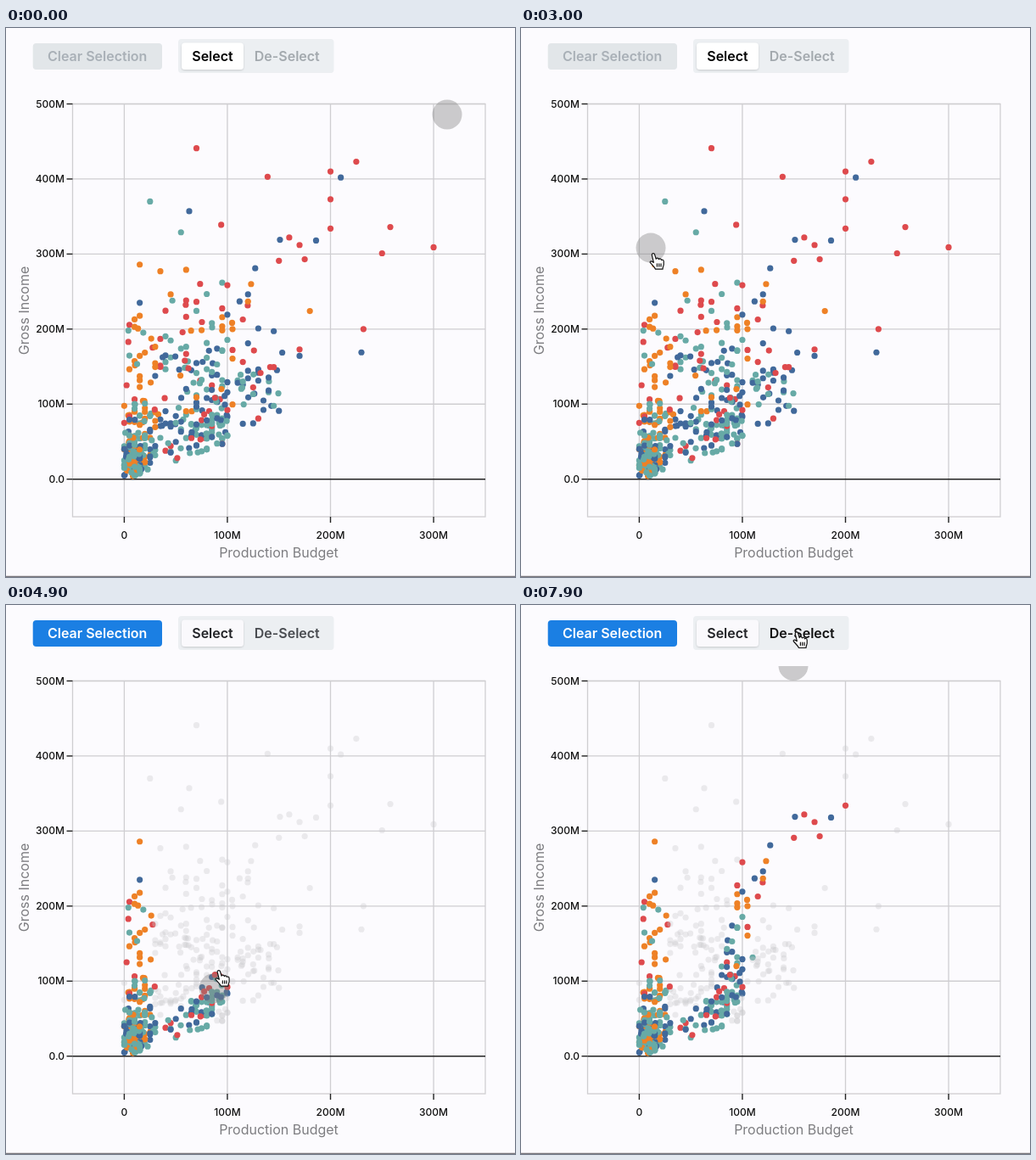
Animation, 600 px wide and 647 px high, one loop 8 s. Source, as an HTML page:

```html
<!DOCTYPE html>
<html lang="en">
<head>
<meta charset="utf-8">
<title>Brush selection on a scatter plot</title>
<style>
html, body { margin: 0; width: 100%; height: 100%; overflow: hidden; background: #fcfbfe; }
svg { display: block; font-family: Inter, Roboto, "Liberation Sans", sans-serif; }
.btn { font-size: 16px; font-weight: 600; text-anchor: middle; }
.tick { font-size: 12px; font-weight: 500; fill: #111; }
.label { font-size: 16px; fill: #7d7d80; text-anchor: middle; }
.grid { stroke: #cfced1; stroke-width: 1.3; fill: none; }
.axis { stroke: #222; stroke-width: 1.4; }
</style>
</head>
<body>
<svg width="600" height="647" viewBox="0 0 600 647">
  <defs>
    <clipPath id="chart"><rect y="72" width="600" height="575"/></clipPath>
    <filter id="soft" x="-20%" y="-20%" width="140%" height="150%">
      <feDropShadow dx="0" dy="1" stdDeviation="1.2" flood-opacity=".16"/>
    </filter>
  </defs>
  <rect id="clearBox" x="31.7" y="18" width="152.3" height="31" rx="4"/>
  <text id="clearText" class="btn" x="107.7" y="39">Clear Selection</text>
  <rect x="203" y="13" width="183.5" height="40" rx="4" fill="#eceff2"/>
  <rect id="tab" x="207" y="17.5" width="73" height="31.5" rx="4" filter="url(#soft)"/>
  <text id="selectText" class="btn" x="243.5" y="39">Select</text>
  <text id="deselectText" class="btn" x="331.3" y="39">De-Select</text>
  <g id="axes"></g>
  <text class="label" x="321.5" y="624">Production Budget</text>
  <text class="label" transform="translate(27 333) rotate(-90)">Gross Income</text>
  <g id="dots"></g>
  <g clip-path="url(#chart)"><circle id="brush" r="17.5" fill="#808080" fill-opacity=".4"/></g>
  <path d="M0 646.3H600" stroke="#77767a" stroke-width="1.3"/>
  <g id="arrow" stroke="#fff" stroke-width="1.2" stroke-linejoin="round">
    <path d="M0 0V17.2L4 13.6 6.6 19.6 9.6 18.3 7 12.4H12.4Z" fill="#000"/>
  </g>
  <g id="hand" stroke="#111" stroke-width="1.2" stroke-linejoin="round" stroke-linecap="round">
    <path fill="#fff" d="M-1.8 1.8C-1.8-.6 1.2-.6 1.6 1.4L3.2 6.6C3.4 5 6 5 6.4 7 7 5.8 9.2 6 9.4 7.8 10.2 7 12.2 7.4 12.2 9.4V13C12 15 11 16 11 18.5H2.5C1.5 16-1 14-3.6 11-4.6 9.4-2.6 8.4-.6 10.2L.4 10.6Z"/>
    <path fill="none" d="M4.4 12.2V15.4M6.7 12.2V15.4M9 12.2V15.4"/>
  </g>
</svg>
<script>
const LOOP = 8000, LAG = 90, RADIUS = 17.5, TOP = 71.5;
const PRESS = 2950, RELEASE = 6020, EXIT = 7400;
const RED = "#de4a4d", BLUE = "#41699b", ORANGE = "#ee8126", TEAL = "#67aaa6";

const $ = id => document.getElementById(id);
const xAt = budget => 139.4 + budget * 1.2155;
const yAt = gross => 531.7 - gross * 0.8844;

function add(parent, tag, attrs, text) {
  const el = document.createElementNS("http://www.w3.org/2000/svg", tag);
  for (const k in attrs) el.setAttribute(k, attrs[k]);
  if (text) el.textContent = text;
  parent.appendChild(el);
  return el;
}

// Axes and grid
const axes = $("axes");
add(axes, "rect", { class: "grid", x: 78.5, y: 89.5, width: 486.5, height: 486.5 });
for (let i = 0; i < 4; i++) {
  const x = xAt(i * 100);
  add(axes, "path", { class: "grid", d: `M${x} 89.5V576` });
  add(axes, "path", { class: "axis", d: `M${x} 576v7` });
  add(axes, "text", { class: "tick", x, y: 602, "text-anchor": "middle" }, i ? i + "00M" : "0");
}
for (let i = 0; i < 6; i++) {
  const y = yAt(i * 100);
  add(axes, "path", { class: i ? "grid" : "axis", d: `M78.5 ${y}H565` });
  add(axes, "path", { class: "axis", d: `M71.5 ${y}h7` });
  add(axes, "text", { class: "tick", x: 69, y: y + 4, "text-anchor": "end" }, i ? i + "00M" : "0.0");
}

// Seeded clouds of films; budgets mostly fall on round numbers
let seed = 11;
const rand = () => (seed = (seed * 16807) % 2147483647) / 2147483647;
const mix = (a, b, f) => a + (b - a) * f;
const points = [];

function plot(color, budget, gross) {
  points.push({ x: xAt(budget), y: yAt(gross), color });
}

function cloud(count, [b0, b1], [g0, g1], skew, colors) {
  for (let i = 0; i < count; i++) {
    let b = mix(b0, b1, rand());
    if (rand() < 0.65) b = Math.round(b / 5) * 5;
    const low = Math.max(g0, b * 0.45);
    plot(colors[Math.floor(rand() * colors.length)], b, mix(low, g1, rand() ** skew));
  }
}

cloud(28, [35, 105], [185, 262], 1.2, [RED, RED, ORANGE, BLUE, TEAL]);
cloud(85, [32, 104], [85, 185], 1.1, [BLUE, BLUE, TEAL, TEAL, ORANGE, RED]);
cloud(80, [32, 102], [18, 85], 0.8, [TEAL, TEAL, TEAL, BLUE, BLUE, RED]);
cloud(28, [105, 150], [95, 150], 1, [BLUE, BLUE, BLUE, TEAL, RED]);
cloud(20, [105, 178], [30, 250], 1, [BLUE, BLUE, RED, RED, ORANGE]);
cloud(52, [2, 30], [75, 220], 1.7, [ORANGE, ORANGE, ORANGE, TEAL, TEAL, RED]);
cloud(75, [1, 30], [12, 80], 1.1, [TEAL, TEAL, ORANGE, ORANGE, BLUE]);
cloud(60, [0, 18], [0, 50], 1, [TEAL, TEAL, TEAL, ORANGE, BLUE]);

// The few films far from the crowd: budget, gross
const outliers = [
  [RED, [70, 441], [139, 403], [200, 410], [225, 423], [200, 373], [200, 334], [160, 322],
    [170, 312], [258, 336], [300, 309], [250, 301], [175, 293], [150, 291], [94, 339], [232, 200]],
  [BLUE, [210, 402], [63, 357], [151, 319], [186, 318], [127, 281], [15, 235], [230, 169]],
  [TEAL, [25, 370], [55, 329], [4, 198]],
  [ORANGE, [15, 286], [35, 277], [60, 279], [123, 260], [180, 224]]
];
for (const [color, ...films] of outliers) for (const film of films) plot(color, ...film);

// Brush path: time, x, y; the pointer runs ahead of it by LAG
const path = [
  [0, 520, 102], [700, 520, 102], [1900, 206, 136], [2000, 193, 141], [2800, 152, 254],
  [3000, 153, 259], [3150, 158, 270], [4200, 158, 477], [4350, 149, 516], [4480, 183, 504],
  [4720, 228, 482], [4900, 245, 452], [5100, 258, 405], [5320, 271, 345], [5450, 273, 308],
  [5560, 290, 296], [5750, 322, 266], [5900, 345, 260], [6050, 370, 232], [6800, 370, 232],
  [EXIT, 321, TOP], [7700, 325, 32]
];

function along(t) {
  const i = path.findIndex(k => k[0] > t);
  if (i < 0) return path[path.length - 1].slice(1);
  const [t0, x0, y0] = path[i - 1], [t1, x1, y1] = path[i];
  const f = (t - t0) / (t1 - t0);
  return [mix(x0, x1, f), mix(y0, y1, f)];
}

// When does the pressed brush first touch each point?
for (const p of points) {
  p.hit = Infinity;
  for (let t = PRESS; t <= RELEASE + LAG && p.hit > t; t += 10) {
    const [x, y] = along(t);
    if (Math.hypot(p.x - x, p.y - y) <= RADIUS) p.hit = t;
  }
  p.el = add($("dots"), "circle", { cx: p.x, cy: p.y, r: 3.6 });
}
const firstHit = Math.max(3050, Math.min(...points.map(p => p.hit)));

function fill(el, color) {
  if (el.shown !== color) el.setAttribute("fill", el.shown = color);
}
function place(el, [x, y], visible) {
  el.setAttribute("transform", `translate(${x} ${y})`);
  el.setAttribute("visibility", visible ? "visible" : "hidden");
}

function draw(t) {
  const active = t >= firstHit;
  for (const p of points) {
    fill(p.el, !active || t >= p.hit ? p.color : "rgba(200,200,204,.35)");
  }

  const tip = along(t + LAG);
  const overTab = tip[1] < 53;
  const hand = overTab || (t >= PRESS && t < RELEASE);
  const shown = t >= 650;
  place($("brush"), along(Math.min(t, EXIT)), true);
  place($("arrow"), tip, shown && !hand);
  place($("hand"), tip, shown && hand);

  fill($("clearBox"), active ? "#1b7fe3" : "#e2e6e9");
  fill($("clearText"), active ? "#fff" : "#a9b0b7");
  fill($("tab"), active ? "#faf9fc" : "#fff");
  fill($("selectText"), active ? "#222327" : "#000");
  fill($("deselectText"), overTab ? "#111" : active ? "#494c51" : "#a3a9ae");
}

const start = performance.now();
function frame() {
  draw((performance.now() - start) % LOOP);
  requestAnimationFrame(frame);
}
frame();
</script>
</body>
</html>
```
